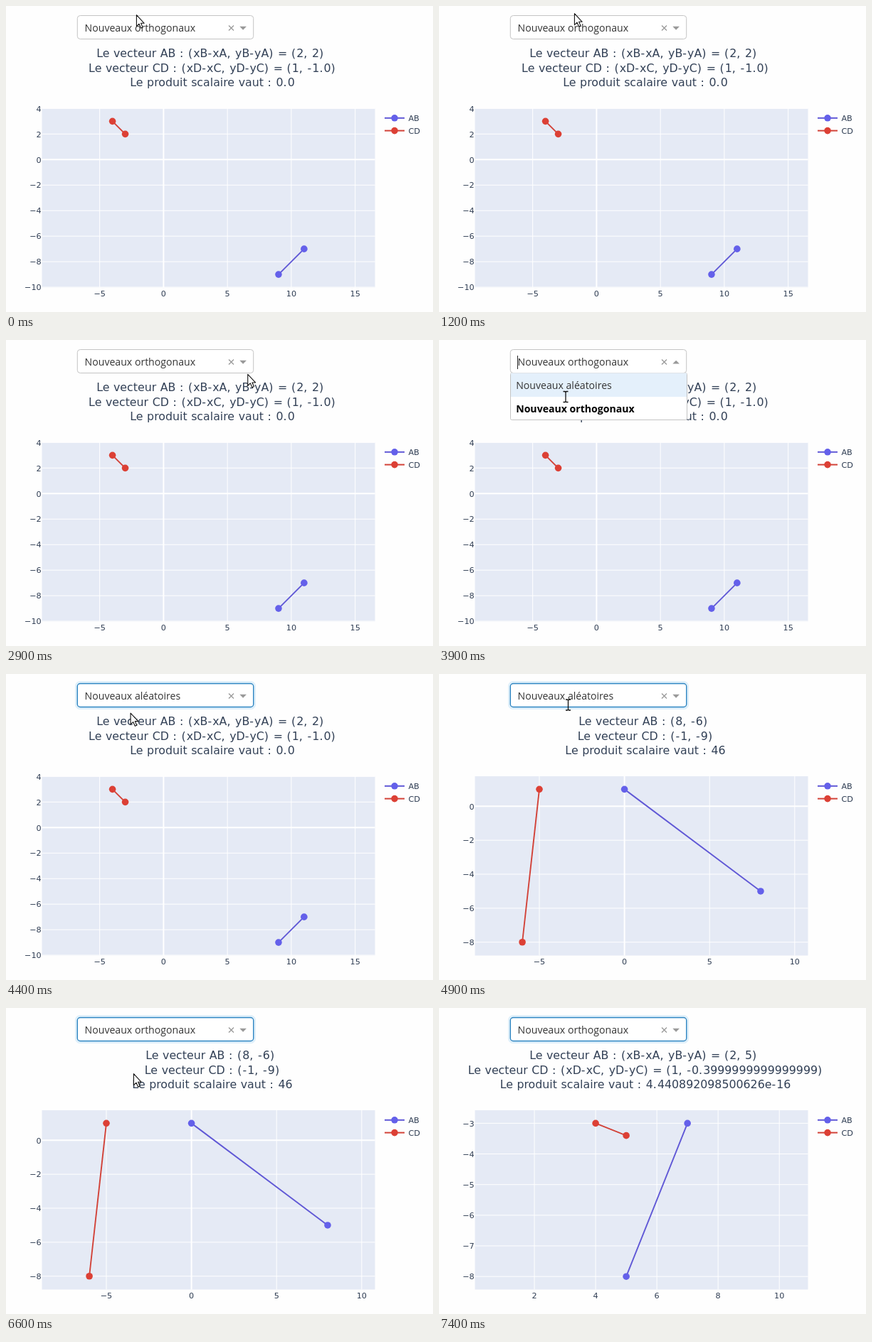
Recreate the animation shown at these times as an HTML page. Size 600x431 px, loop 8.8 s.

```html
<!DOCTYPE html>
<html lang="fr">
<head>
<meta charset="utf-8">
<title>Produit scalaire</title>
<style>
html, body { margin: 0; width: 100%; height: 100%; overflow: hidden; background: #fefefe; }
svg { display: block; width: 600px; height: 431px; }
text { white-space: pre; }
.title { font: 15.8px "DejaVu Sans", sans-serif; fill: #324056; text-anchor: middle; word-spacing: .55px; }
.punct { letter-spacing: 1.1px; }
.tick, .legend { font: 11.2px "DejaVu Sans", sans-serif; fill: #2f3d53; }
.menu { font: 14.1px "Open Sans", "Noto Sans", sans-serif; fill: #333; }
</style>
</head>
<body>
<svg id="stage" viewBox="0 0 600 431"></svg>
<script>
const LOOP = 8800;
const BLUE = { dot: '#6460ea', line: '#6058d6' };
const RED = { dot: '#dc4035', line: '#d24238' };
const OPTIONS = ['Nouveaux aléatoires', 'Nouveaux orthogonaux'];
const stage = document.getElementById('stage');

function add(parent, tag, attrs, text) {
  const el = document.createElementNS('http://www.w3.org/2000/svg', tag);
  for (const k in attrs) el.setAttribute(k, attrs[k]);
  if (text !== undefined) el.textContent = text;
  parent.appendChild(el);
  return el;
}
const show = (el, on) => { el.style.display = on ? '' : 'none'; };

// x0, y0: pixel place of the origin; ux, uy: pixels per unit; ticks: first, last, step
const charts = [
  { from: 0, x0: 221.4, y0: 216.3, ux: 17.95, uy: 17.98,
    xt: [-5, 15, 5], yt: [-10, 4, 2],
    ab: [9, -9, 11, -7], cd: [-4, 3, -3, 2],
    lines: ['Le vecteur AB : (xB-xA, yB-yA) = (2, 2)\u00a0',
            'Le vecteur CD : (xD-xC, yD-yC) = (1, -1.0)',
            'Le produit scalaire vaut : 0.0'] },
  { from: 4800, x0: 260.6, y0: 186.3, ux: 23.92, uy: 23.93,
    xt: [-5, 10, 5], yt: [-8, 0, 2],
    ab: [0, 1, 8, -5], cd: [-5, 1, -6, -8],
    lines: ['Le vecteur AB : (8, -6)\u00a0',
            'Le vecteur CD : (-1, -9)',
            'Le produit scalaire vaut : 46'] },
  { from: 6700, x0: 48, y0: 32.9, ux: 43.02, uy: 43.16,
    xt: [2, 10, 2], yt: [-8, -3, 1],
    ab: [5, -8, 7, -3], cd: [4, -3, 5, -3.4],
    lines: ['Le vecteur AB : (xB-xA, yB-yA) = (2, 5)\u00a0',
            'Le vecteur CD : (xD-xC, yD-yC) = (1, -0.3999999999999999)',
            'Le produit scalaire vaut : 4.440892098500626e-16'] }
];

function addTitle(g, line, i) {
  const t = add(g, 'text', { class: 'title', x: 290, y: 72.3 + i * 20.5 });
  for (const part of line.split(/([(),:.-]+)/)) {
    if (part) add(t, 'tspan', /^[(),:.-]/.test(part) ? { class: 'punct' } : {}, part);
  }
}

function addSegment(g, x1, y1, x2, y2, color) {
  add(g, 'line', { x1, y1, x2, y2, stroke: color.line, 'stroke-width': 1.9 });
  add(g, 'circle', { cx: x1, cy: y1, r: 4.8, fill: color.dot });
  add(g, 'circle', { cx: x2, cy: y2, r: 4.8, fill: color.dot });
}

function eachTick([a, b, step], fn) {
  for (let v = a; v <= b; v += step) fn(v, String(v).replace('-', '−'), v ? 1 : 2);
}

function addChart(c) {
  const g = add(stage, 'g', {});
  const px = v => c.x0 + v * c.ux, py = v => c.y0 - v * c.uy;
  const grid = (x1, y1, x2, y2, w) =>
    add(g, 'line', { x1, y1, x2, y2, stroke: '#fff', 'stroke-width': w });
  eachTick(c.xt, (v, label, w) => {
    grid(px(v), 144, px(v), 396.5, w);
    add(g, 'text', { class: 'tick', x: px(v), y: 409, 'text-anchor': 'middle' }, label);
  });
  eachTick(c.yt, (v, label, w) => {
    grid(50.5, py(v), 518.5, py(v), w);
    add(g, 'text', { class: 'tick', x: 49.7, y: py(v) + 4.2, 'text-anchor': 'end' }, label);
  });
  for (const [p, color] of [[c.ab, BLUE], [c.cd, RED]]) {
    addSegment(g, px(p[0]), py(p[1]), px(p[2]), py(p[3]), color);
  }
  c.lines.forEach((line, i) => addTitle(g, line, i));
  return g;
}

add(stage, 'rect', { x: 50.5, y: 144, width: 468, height: 252.5, fill: '#e5eaf5' });
const chartEls = charts.map(addChart);

[['AB', 157.8, BLUE], ['CD', 175.6, RED]].forEach(([name, y, color]) => {
  add(stage, 'line', { x1: 532, x2: 560, y1: y, y2: y, stroke: color.line, 'stroke-width': 2 });
  add(stage, 'circle', { cx: 546, cy: y, r: 4.8, fill: color.dot });
  add(stage, 'text', { class: 'legend', x: 565.4, y: y + 4.2 }, name);
});

// Dropdown
const ring = add(stage, 'rect', { x: 98.5, y: 11.5, width: 251, height: 37, rx: 5.5,
  fill: 'none', stroke: '#e0f0fa', 'stroke-width': 3 });
const field = add(stage, 'rect', { x: 100.3, y: 13.5, width: 247.4, height: 33, rx: 4, fill: '#fff' });
const menu = add(stage, 'g', {});
add(menu, 'rect', { x: 100.5, y: 46.5, width: 248, height: 66, rx: 2, fill: '#fff', stroke: '#c4c4c4' });
const hover = add(menu, 'rect', { x: 101, width: 247, height: 33, fill: '#e4f0fb' });
add(menu, 'line', { x1: 101, x2: 348, y1: 46.5, y2: 46.5, stroke: '#e0e4e8' });
const items = OPTIONS.map((name, i) =>
  add(menu, 'text', { class: 'menu', x: 108.2, y: 69.2 + i * 33 }, name));
const value = add(stage, 'text', { class: 'menu', x: 110.6, y: 36 });
const caret = add(stage, 'line', { x1: 110.5, x2: 110.5, y1: 22, y2: 41, stroke: '#222' });
add(stage, 'path', { d: 'M313 27.5l7 7m0-7l-7 7', stroke: '#999', 'stroke-width': 1.3 });
const chevron = add(stage, 'path', { fill: '#999' });

// Pointer
const arrow = add(stage, 'path', { d: 'M.4-.3V15.6L4 12.2 6.6 18 9.1 16.9 6.6 11.3H11.2Z',
  fill: '#fff', stroke: '#111', 'stroke-width': 1.1, 'stroke-linejoin': 'round' });
const beam = add(stage, 'path', { d: 'M-3.5-7.5H-1L0-6.5 1-7.5H3.5M0-6.5V6.5M-3.5 7.5H-1L0 6.5 1 7.5H3.5',
  fill: 'none', stroke: '#111', 'stroke-width': 1.3 });

// time, x, y
const path = [
  [0, 183, 13], [100, 176, 60], [200, 147, 160], [400, 412, 330], [500, 377, 187],
  [900, 377, 187], [1200, 190, 11], [1500, 106, 187], [1600, 106, 187], [1700, 66, 133],
  [1800, 66, 133], [2100, 148, 13], [2400, 569, 162], [2700, 356, 98], [3000, 331, 24],
  [3100, 331, 24], [3300, 349, 99], [3400, 349, 99], [3900, 178, 80], [4300, 172, 66],
  [4600, 180, 34], [4900, 181.5, 43.5], [5100, 181.5, 43.5], [5300, 366, 232],
  [5500, 329, 30], [5600, 186, 80], [6000, 190, 98], [6300, 188, 98], [6600, 179, 93],
  [6800, 160, 90], [7200, 160, 90], [7300, 234, 95]
];

function pointerAt(t) {
  const i = path.findIndex(p => p[0] > t);
  if (i < 0) return path[path.length - 1].slice(1);
  const [a, b] = [path[i - 1], path[i]];
  const k = (t - a[0]) / (b[0] - a[0]);
  return [a[1] + (b[1] - a[1]) * k, a[2] + (b[2] - a[2]) * k];
}

const within = (t, a, b) => t >= a && t < b;

function draw(time) {
  const t = Math.floor((time % LOOP) / 100) * 100;
  const open = within(t, 3100, 4300) || within(t, 5500, 6300);
  const focus = t >= 4300 && !open;
  const chosen = within(t, 4300, 6300) ? 0 : 1;
  const [x, y] = pointerAt(t);

  const current = charts.filter(c => c.from <= t).length - 1;
  chartEls.forEach((el, i) => show(el, i === current));

  show(ring, focus);
  field.setAttribute('stroke', focus ? '#2f86c2' : '#c4c4c4');
  field.setAttribute('stroke-width', focus ? 1.4 : 1);
  value.textContent = OPTIONS[chosen];
  chevron.setAttribute('d', open ? 'M328.3 33.5h9.6l-4.8-4.8z' : 'M328.3 28.8h9.6l-4.8 4.9z');
  show(caret, within(t, 3100, 3300) || within(t, 3800, 4300));

  show(menu, open);
  const over = x < 348 && y > 47 ? +(y > 80.5) : chosen;
  hover.setAttribute('y', 47 + over * 33);
  items.forEach((el, i) => {
    el.style.fontWeight = i === chosen ? 700 : 400;
    el.style.fill = i === chosen ? '#000' : '#333';
  });

  const inText = x > 104 && x < 300 && y >= 21 && y < (open ? 113 : 44);
  const visible = t < 7400;
  show(arrow, visible && !inText);
  show(beam, visible && inText);
  (inText ? beam : arrow).setAttribute('transform', `translate(${x} ${y})`);
}

const start = performance.now();
function tick() {
  draw(performance.now() - start);
  requestAnimationFrame(tick);
}
tick();
</script>
</body>
</html>
```
